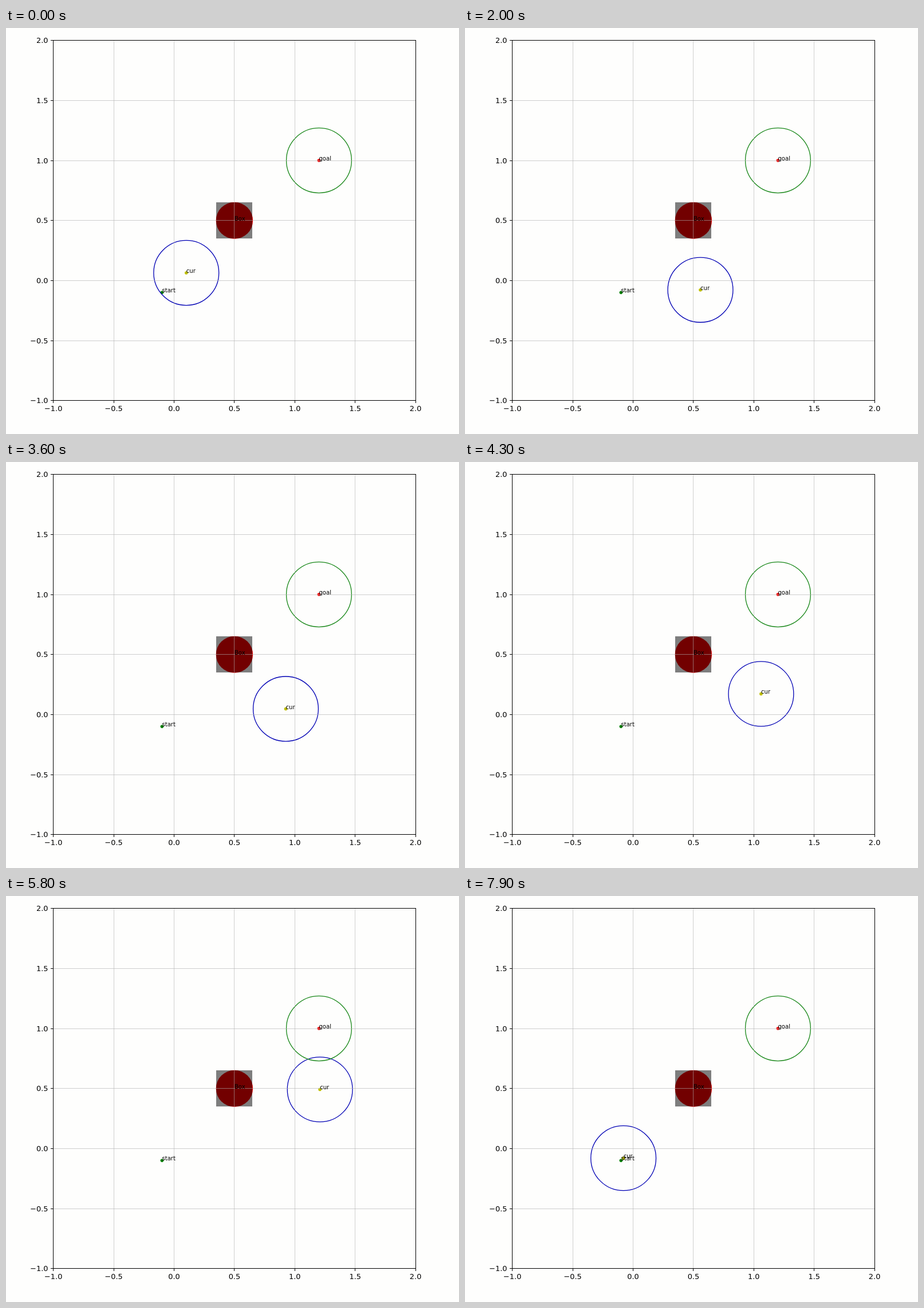
These frames come from a looping animation (791 px wide and 708 px high, 8000 ms). An HTML page with a canvas:

```html
<!DOCTYPE html>
<html lang="en">
<head>
<meta charset="utf-8">
<title>Path planning</title>
<style>
  html, body { margin: 0; width: 100%; height: 100%; overflow: hidden; background: #fefefd; }
  canvas { display: block; }
</style>
</head>
<body>
<canvas id="stage" width="791" height="708"></canvas>
<script>
const ctx = document.getElementById('stage').getContext('2d');
const LOOP = 8000, STEP = 100;
const LEFT = 82.7, RIGHT = 715.1, TOP = 21.6, BOTTOM = 649.8;
const UX = (RIGHT - LEFT) / 3, UY = (BOTTOM - TOP) / 3;
const RESET = 78, PACE = 0.02;
const start = [-0.1, -0.1], goal = [1.2, 1], box = [0.5, 0.5];

const px = x => LEFT + (x + 1) * UX;
const py = y => BOTTOM - (y + 1) * UY;
const snap = v => Math.floor(v) + 0.5;

// Key points of the drive around the box: step, x, y
const path = [
  [-1, 0.08, 0.047], [0, 0.101, 0.064], [9, 0.285, -0.016], [12, 0.36, -0.048],
  [21, 0.582, -0.077], [28, 0.753, -0.042], [36, 0.925, 0.047], [43, 1.06, 0.172],
  [54, 1.183, 0.39], [58, 1.208, 0.492], [69, 1.214, 0.744], [77, 1.205, 0.955]
];

const secant = (a, b, k) => (b[k] - a[k]) / (b[0] - a[0]);

function slope(i, k) {
  const [a, b, c] = [path[i - 1], path[i], path[i + 1]];
  if (!c) return secant(a, b, k);
  const before = b[0] - a[0], after = c[0] - b[0];
  return (secant(a, b, k) * after + secant(b, c, k) * before) / (before + after);
}

// Smooth curve through the key points, then a straight new departure
function robotAt(step) {
  if (step >= RESET) return start.map(v => v + PACE * (step - RESET));
  let i = 1;
  while (i < path.length - 2 && step >= path[i + 1][0]) i++;
  const a = path[i], b = path[i + 1], h = b[0] - a[0], u = (step - a[0]) / h;
  return [1, 2].map(k =>
    a[k] * (1 + 2 * u) * (1 - u) ** 2 + b[k] * u * u * (3 - 2 * u) +
    h * (slope(i, k) * u * (1 - u) ** 2 - slope(i + 1, k) * u * u * (1 - u)));
}

function line(x1, y1, x2, y2, color) {
  ctx.strokeStyle = color;
  ctx.lineWidth = 1;
  ctx.beginPath();
  ctx.moveTo(x1, y1);
  ctx.lineTo(x2, y2);
  ctx.stroke();
}

function ring([x, y], color) {
  ctx.strokeStyle = color;
  ctx.lineWidth = 1.3;
  ctx.beginPath();
  ctx.ellipse(px(x), py(y), 0.27 * UX, 0.27 * UY, 0, 0, 2 * Math.PI);
  ctx.stroke();
}

function disc([x, y], rx, ry, color) {
  ctx.fillStyle = color;
  ctx.beginPath();
  ctx.ellipse(px(x), py(y), rx, ry, 0, 0, 2 * Math.PI);
  ctx.fill();
}

const dot = (at, color) => disc(at, 2.8, 2.8, color);

function text(str, x, y, size, align) {
  ctx.fillStyle = '#000';
  ctx.font = size + 'px "DejaVu Sans", sans-serif';
  ctx.textAlign = align;
  ctx.fillText(str, x, Math.round(y));
}

const label = (str, [x, y]) => text(str, px(x), py(y), 10.1, 'left');

function drawObstacle() {
  const [x, y] = box, r = 0.15;
  const x1 = Math.floor(px(x - r)), x2 = Math.floor(px(x + r));
  const y1 = Math.floor(py(y + r)), y2 = Math.floor(py(y - r));
  disc(box, r * UX + 0.6, r * UY + 0.6, '#e60000');
  ctx.fillStyle = 'rgba(0,0,0,0.5)';
  ctx.fillRect(x1, y1, x2 - x1, y2 - y1);
}

function drawGrid() {
  for (let v = -0.5; v < 2; v += 0.5) {
    const x = snap(px(v)), y = snap(py(v));
    line(x, TOP, x, BOTTOM, 'rgba(176,176,176,0.6)');
    line(LEFT, y, RIGHT, y, 'rgba(176,176,176,0.6)');
  }
}

function drawAxes() {
  const l = snap(LEFT), r = snap(RIGHT), t = snap(TOP), b = snap(BOTTOM);
  ctx.strokeStyle = '#000';
  ctx.lineWidth = 1;
  ctx.strokeRect(l, t, r - l, b - t);
  for (let v = -1; v <= 2; v += 0.5) {
    const x = px(v), y = py(v);
    const name = v.toFixed(1).replace('-', '\u2212');
    line(snap(x), b, snap(x), b + 4.5, '#000');
    line(l - 4.5, snap(y), l, snap(y), '#000');
    text(name, x, b + 18.5, 12.9, 'center');
    text(name, l - 9, y + 4.6, 12.9, 'right');
  }
}

function draw(step) {
  const robot = robotAt(step);
  ctx.fillStyle = '#fefefd';
  ctx.fillRect(0, 0, 791, 708);
  drawObstacle();
  dot(goal, '#f00000');
  dot(robot, '#bfbf00');
  dot(start, '#008000');
  ring(robot, '#0000b4');
  ring(goal, '#1a881a');
  drawGrid();
  drawAxes();
  label('Box', box);
  label('start', start);
  label('goal', goal);
  label('cur', robot);
}

const began = performance.now();
function tick() {
  const t = (performance.now() - began) % LOOP;
  draw(Math.floor(t / STEP));
  requestAnimationFrame(tick);
}
tick();
</script>
</body>
</html>
```
